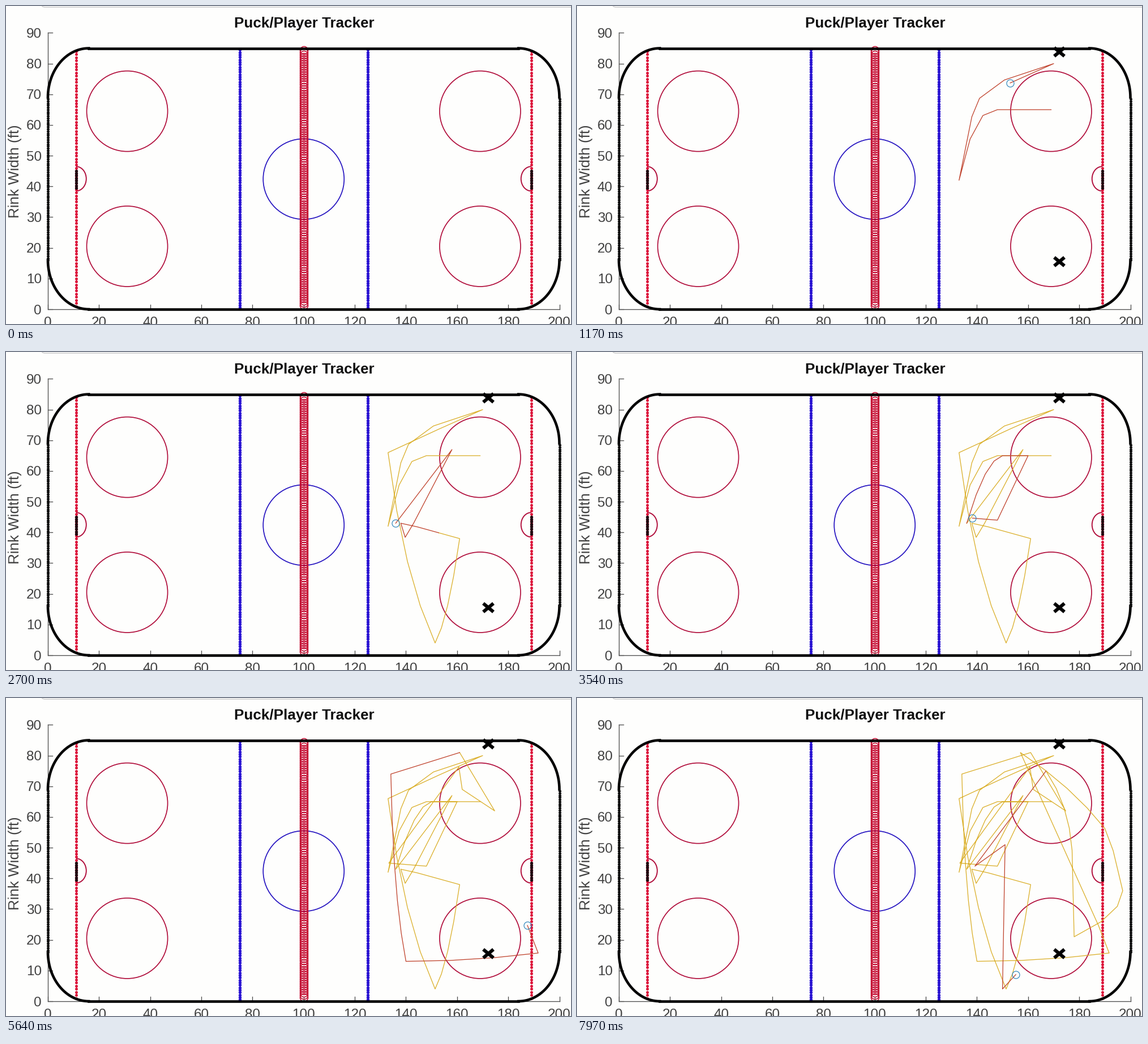
These frames come from a looping animation (998 px wide and 561 px high, 8 s). A matplotlib script:

```python
import numpy as np
import matplotlib.pyplot as plt
from matplotlib.animation import FuncAnimation
from matplotlib.patches import Arc, Ellipse, Polygon

W, H = 998, 561
X0, Y0 = 74, 535             # pixel position of the plot's zero point
SX, SY = 4.5175, 5.417       # pixels per foot
PT = 0.72                    # points per pixel
FRAMES = 240
START, PACE = 14, 0.48       # first puck frame, steps per frame
BODY = 12                    # steps in the fresh part of the trail

CRIMSON, RED, BLUE = "#b00c3a", "#dc1238", "#2a14d2"
GREY, INK = "#4c4c4c", "#404040"

plt.rcParams["font.family"] = "Liberation Sans"
fig = plt.figure(figsize=(W / 100, H / 100), dpi=100, facecolor="#fefefd")
ax = fig.add_axes([0, 0, 1, 1])
ax.set_xlim(-X0 / SX, (W - X0) / SX)
ax.set_ylim((Y0 - H) / SY, Y0 / SY)
ax.axis("off")


def px(x, y):
    """Stage pixels to rink feet."""
    return (x - X0) / SX, (Y0 - y) / SY


def line(xs, ys, color, width, **kw):
    return ax.plot(xs, ys, color=color, lw=width * PT, **kw)[0]


def dots(x, lo, hi, color, size, step=1.0):
    ys = np.arange(lo, hi + 0.01, step)
    ax.plot(np.full_like(ys, x), ys, "o", color=color, ms=size * PT, mew=0)


def label(x, y, text, size, **kw):
    ax.text(*px(x, y), text, fontsize=size * PT, **kw)


def draw_axes():
    line([0, 0, 200], [90, 0, 0], GREY, 1.3)
    for v in range(0, 91, 10):
        line([0, 8 / SX], [v, v], GREY, 1.3)
        label(63, Y0 - v * SY, str(v), 24.3, color=INK,
              ha="right", va="center_baseline")
    for v in range(0, 201, 20):
        line([v, v], [0, 8 / SY], GREY, 1.3)
        label(X0 + v * SX, 565, str(v), 24.3, color=INK,
              ha="center", va="baseline")
    label(526.5, 38, "Puck/Player Tracker", 26, color="#101010",
          weight="bold", ha="center", va="baseline")
    label(23, 292, "Rink Width (ft)", 26, color=INK, rotation=90,
          rotation_mode="anchor", ha="center", va="baseline")
    edge = np.array([px(63, -1), px(64.5, 1), px(68, 2), px(W, 2)])
    line(*edge.T, "#cccccc", 1.5)


def draw_boards(r=16):
    a = np.linspace(0, np.pi / 2, 30)
    for sx, cx in ((-1, r), (1, 200 - r)):
        for sy, cy in ((-1, r), (1, 85 - r)):
            line(cx + sx * r * np.cos(a), cy + sy * r * np.sin(a),
                 "black", 4.6)
    for y in (0, 85):
        line([r, 200 - r], [y, y], "black", 4.6)
    for x in (0, 200):
        dots(x, r, 85 - r, "#101010", 5, 0.7)


def draw_rink():
    # centre line of overlapping rings
    ys = np.arange(1.2, 84.5, 0.75)
    ax.plot(np.full_like(ys, 100), ys, "o", mfc="none", mec="#c40c32",
            ms=14 * PT, mew=1.6 * PT)
    for x in (75, 125):
        dots(x, 0.5, 84.5, BLUE, 5.4, 0.8)
    for x, t1 in ((11, -90), (189, 90)):
        dots(x, 1, 84, RED, 5)
        dots(x, 39.5, 45.5, "#200810", 5.4, 0.8)
        ax.add_patch(Arc((x, 42.5), 8, 8, theta1=t1, theta2=t1 + 180,
                         color=CRIMSON, lw=1.9 * PT))
    spots = [(x, y, CRIMSON) for x in (31, 169) for y in (20.5, 64.5)]
    for x, y, c in spots + [(100, 42.4, "#2412c0")]:
        ax.add_patch(Ellipse((x, y), 143 / SX, 142 / SY, fill=False,
                             ec=c, lw=1.7 * PT))
    draw_boards()


def cross(x, y):
    arms = []
    for s in (-1, 1):
        ends = np.array([px(x - 9, y - 7.5 * s), px(x + 9, y + 7.5 * s)])
        arms.append(line(*ends.T, "black", 6, solid_capstyle="butt", zorder=5))
    return arms


def arrow(x, y):
    shape = [(0, 0), (0, 27), (6, 21), (11, 32), (15, 30), (10, 20), (18, 19)]
    return ax.add_patch(Polygon([px(x + u, y + v) for u, v in shape],
                                fc="white", ec="#8a8a8a", lw=1.2 * PT,
                                zorder=8))


path = [np.array([169, 65])]


def go(x, y, steps, bend=None):
    """Pass the puck to (x, y), straight or along a quadratic curve."""
    a, b = path[-1], np.array([x, y])
    c = (a + b) / 2 if bend is None else np.array(bend)
    for t in np.arange(1, steps + 1) / steps:
        path.append((1 - t) ** 2 * a + 2 * t * (1 - t) * c + t * t * b)


# along the blue line to the half boards and back
go(148, 65, 2)
go(133, 42, 3, bend=(139, 66.5))
go(141, 68.7, 2, bend=(139, 70))
go(170, 80, 2, bend=(146, 75))
go(153, 73.7, 1)
# around the low boards, then give and go at the point
go(133, 66, 1)
go(151.4, 4, 4, bend=(139, 26))
go(161, 38, 4, bend=(156.4, 11.4))
go(144.5, 41.8, 2)
go(138, 43, 1)
go(139.7, 38.4, 1)
go(143, 43, 1)
go(158, 67, 4)
go(136, 43, 4)
# upper circle
go(150, 65, 4, bend=(143.5, 64))
go(160, 65, 2)
go(148, 44, 4)
go(133.3, 45, 3)
go(160.7, 76.3, 7)
go(162, 69, 2)
# across the zone to the far corner
go(174.7, 62, 4)
go(161, 81, 4)
go(134.1, 74, 2)
go(140, 13, 5, bend=(135, 34))
go(191.7, 15.7, 3, bend=(166.2, 13))
go(187.5, 24.7, 2)
# around the net
go(157, 81, 6)
go(190, 56.3, 4, bend=(177, 70))
go(197, 36, 2, bend=(193, 52))
go(178, 21, 3, bend=(197, 28.3))
go(177.2, 49.2, 3)
# back to the point and down
go(167, 75, 4, bend=(176, 64))
go(139.2, 44, 5)
go(151, 51, 2)
go(150, 4, 3)
go(155.2, 8.7, 2)
path = np.array(path)

draw_axes()
draw_rink()
marks = cross(852, 81) + cross(852, 451)
tail = line([], [], "#dbb02c", 1.3, zorder=4)
body = line([], [], "#c0442e", 1.3, zorder=4.5)
head = line([], [], "#2f86bc", 0, marker="o", mfc="none", ms=13 * PT,
            mew=1.2 * PT, zorder=6)
# a mouse pointer sweeps by, leaving fading copies
pointers = [(arrow(22 + 148 * k, 504 + 18 * k), 126 + 1.5 * k)
            for k in range(3)]


def update(frame):
    for m in marks:
        m.set_visible(frame >= 6)
    count = 0
    if frame >= START:
        count = min(int((frame - START) * PACE + 1e-6) + 1, len(path))
    start = max(0, count - 1 - BODY)
    tail.set_data(*path[:start + 1 if start else 0].T)
    body.set_data(*path[start:count].T)
    head.set_data(*path[max(count - 1, 0):count].T)
    for p, peak in pointers:
        p.set_alpha(max(0, 1 - abs(frame - peak) / 2.5))
    return [tail, body, head]


anim = FuncAnimation(fig, update, frames=FRAMES, interval=8000 / FRAMES,
                     init_func=lambda: update(0), repeat=True, repeat_delay=0)
plt.show()
```
